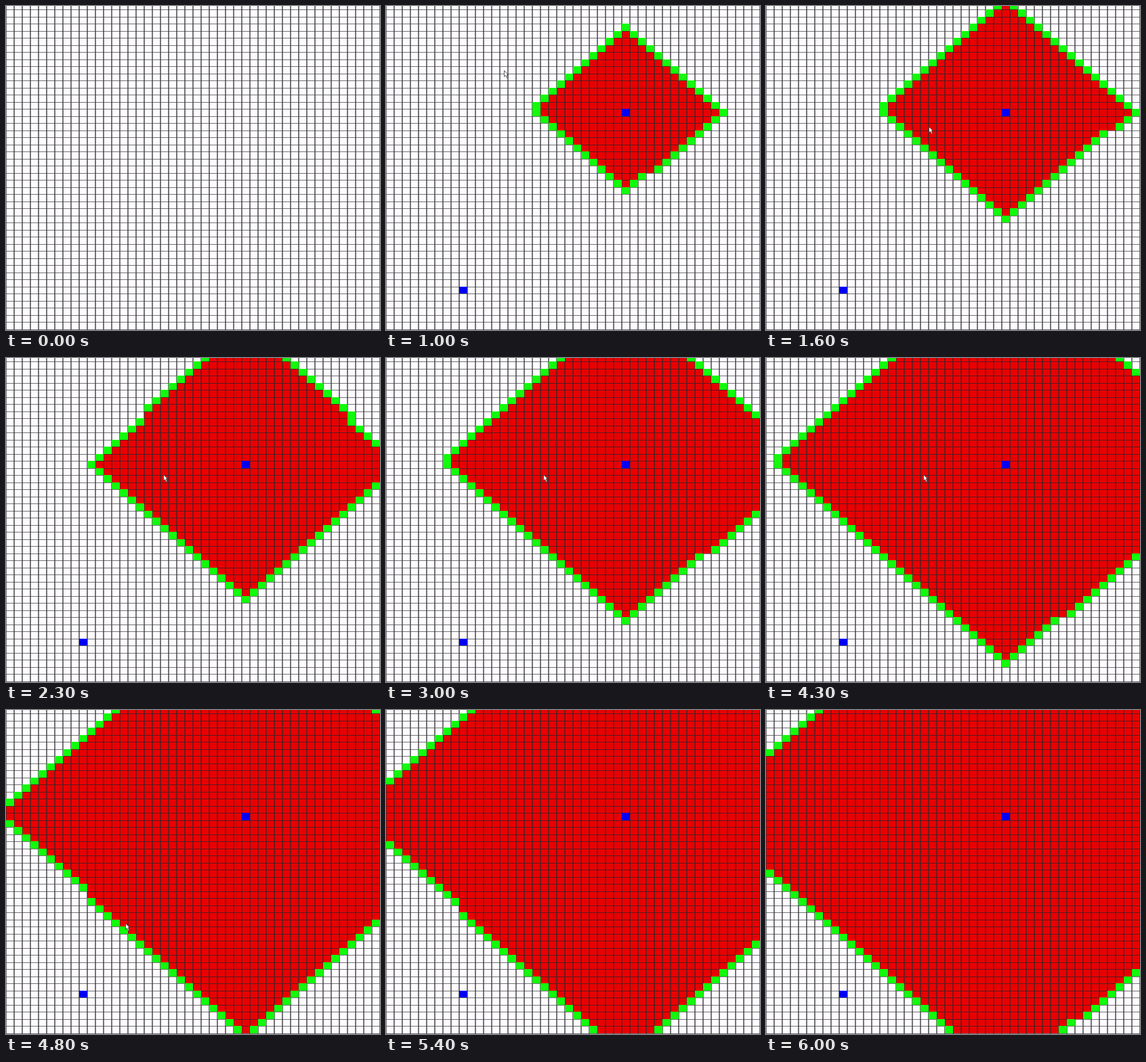
Write an HTML page with a canvas that moves like this. It is 552 px wide and 479 px high and loops after 6100 ms.

```html
<!DOCTYPE html>
<html lang="en">
<head>
<meta charset="utf-8">
<title>Breadth-first search on a grid</title>
<style>
  html, body { margin: 0; width: 100%; height: 100%; overflow: hidden; background: #fdfbfd; }
  canvas { display: block; }
</style>
</head>
<body>
<canvas id="stage" width="552" height="479"></canvas>
<script>
const ctx = document.getElementById('stage').getContext('2d');
const LOOP = 6100, TICK = 100, FIRST = 3;
const SIZE = 50, TOP = -5;
const START = [29, 14], GOAL = [9, 39];

// Cells expanded by a tick, and pointer positions: a few points, joined by straight lines
const EXPANDED = [[10, 250], [16, 452], [48, 1628], [60, 2061]];
const POINTER = [[3, 76, 5], [10, 174, 95], [16, 240, 178], [20, 232, 172], [44, 232, 172], [48, 176, 315]];

const lineX = col => 12 * col;
const lineY = row => Math.round(5 + 10.5 * row);
const inside = (col, row) => col >= 0 && col < SIZE && row >= TOP && row < TOP + SIZE;

// The queue in order of expansion; each cell knows the place of the cell that opened it.
function search() {
  const queue = [], seen = new Set();
  const open = (col, row, parent) => {
    const key = col + ',' + row;
    if (!inside(col, row) || seen.has(key)) return;
    seen.add(key);
    queue.push({ col, row, parent });
  };
  open(...START, -1);
  for (let i = 0; i < queue.length; i++) {
    const { col, row } = queue[i];
    open(col, row - 1, i);
    open(col + 1, row, i);
    open(col, row + 1, i);
    open(col - 1, row, i);
  }
  return queue;
}

const queue = search();

// Linear between the points, carried on past both ends
function sample(points, tick, i) {
  let k = 1;
  while (k < points.length - 1 && points[k][0] < tick) k++;
  const a = points[k - 1], b = points[k];
  return a[i] + (b[i] - a[i]) * (tick - a[0]) / (b[0] - a[0]);
}

function drawGrid() {
  ctx.fillStyle = '#fdfbfd';
  ctx.fillRect(0, 0, 552, 479);
  ctx.fillStyle = '#747378';
  for (let row = 0; row <= 45; row++) ctx.fillRect(0, lineY(row), 552, 1);
  ctx.fillStyle = '#3a393e';
  for (let col = 0; col <= 46; col++) ctx.fillRect(lineX(col) - 0.7, 0, 1.4, 479);
}

function fillCell(col, row, color) {
  const y = lineY(row);
  ctx.fillStyle = color;
  ctx.fillRect(lineX(col), y, 12, lineY(row + 1) - y);
}

function drawVisited(col, row) {
  const x = lineX(col), y = lineY(row), h = lineY(row + 1) - y;
  fillCell(col, row, '#e90000');
  ctx.fillStyle = '#5c1a1f';
  ctx.fillRect(x, y, 12, 1);
  ctx.fillStyle = '#47242a';
  ctx.fillRect(x, y, 0.7, h);
  ctx.fillRect(x + 11.3, y, 0.7, h);
}

function drawPointer(x, y) {
  ctx.save();
  ctx.translate(Math.round(x) + 0.5, Math.round(y) + 0.5);
  ctx.fillStyle = '#fff';
  ctx.strokeStyle = '#333';
  ctx.lineWidth = 0.8;
  const arrow = new Path2D('M0 0V9L2 7L4 11L5 10L4 6H6Z');
  ctx.fill(arrow);
  ctx.stroke(arrow);
  ctx.restore();
}

function draw(tick) {
  drawGrid();
  if (tick < FIRST) return;
  const current = Math.round(sample(EXPANDED, tick, 1));
  queue.forEach(({ col, row, parent }, order) => {
    if (order <= current) drawVisited(col, row);
    else if (parent < current) fillCell(col, row, '#12fa0c');
  });
  fillCell(...START, '#0000f2');
  fillCell(...GOAL, '#0000f2');
  drawPointer(sample(POINTER, tick, 1), sample(POINTER, tick, 2));
}

const began = performance.now();
let shown = -1;
function frame() {
  const tick = Math.floor(((performance.now() - began) % LOOP) / TICK);
  if (tick !== shown) draw(shown = tick);
  requestAnimationFrame(frame);
}
frame();
</script>
</body>
</html>
```
